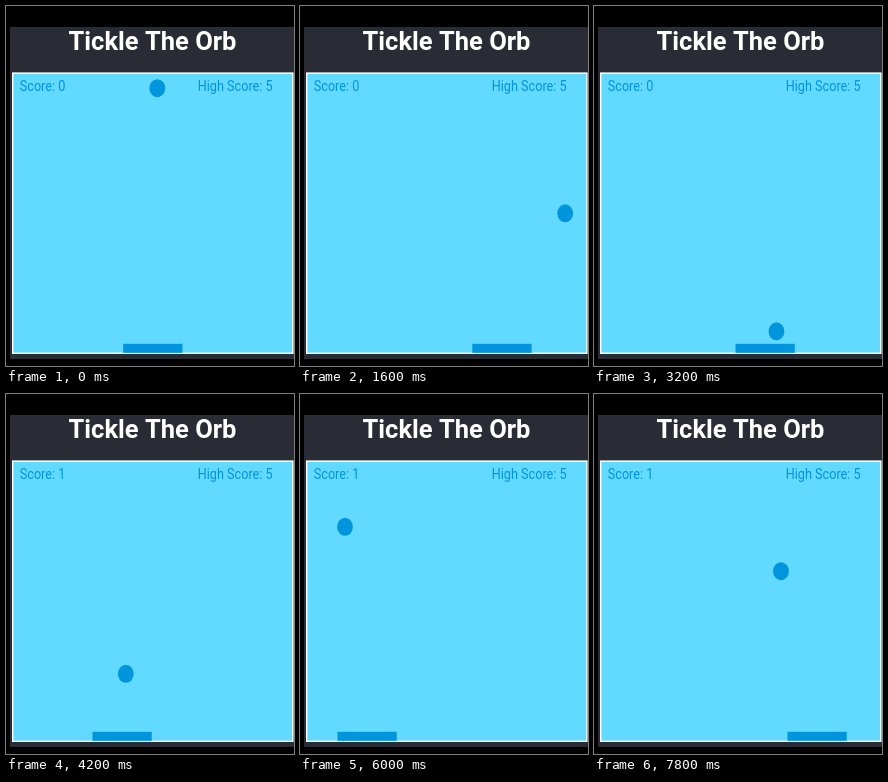
Write an HTML page with a canvas that moves like this. It is 288 px wide and 360 px high and loops after 8 s.

```html
<!DOCTYPE html>
<html lang="en">
<head>
<meta charset="utf-8">
<title>Tickle The Orb</title>
<style>
  html, body { margin: 0; width: 100%; height: 100%; overflow: hidden; background: #000; }
  canvas { display: block; width: 288px; height: 360px; }
</style>
</head>
<body>
<canvas id="stage" width="288" height="360"></canvas>
<script>
const ctx = document.getElementById("stage").getContext("2d");

const LOOP = 8000, STEP = 200;
const BLUE = "#0095dd", SKY = "#62d9fe", DARK = "#292c34";

// The board is drawn in its own units, squeezed onto the stage.
const BOARD = { x: 7, y: 68, sx: 0.79, sy: 0.9 };
// Limits for the centre of the ball, in stage pixels.
const WALL = { left: 15.5, right: 277.5, top: 77, bottom: 337 };
const START = { x: 151.3, y: 82.2 };
const SLOPE = 0.91;

// [time, vertical distance travelled]
const TRAVEL = [[0, 0], [1000, 78], [2400, 188], [4200, 312], [6000, 459], [7000, 567], [7800, 615]];
// [time, left edge of the paddle]
const PADDLE = [[0, 117.2], [1000, 156], [2400, 177], [4200, 86.5], [6000, 37.5], [7000, 131], [7800, 193.5]];

function segment(keys, t) {
  let i = 0;
  while (i < keys.length - 2 && t >= keys[i + 1][0]) i++;
  return i;
}

function linear(keys, t) {
  const i = segment(keys, t);
  const [t0, v0] = keys[i], [t1, v1] = keys[i + 1];
  return v0 + (v1 - v0) * (t - t0) / (t1 - t0);
}

function smooth(keys, t) {
  const i = segment(keys, t), last = keys.length - 1;
  const slope = k => {
    const a = keys[Math.max(k - 1, 0)], b = keys[Math.min(k + 1, last)];
    return (b[1] - a[1]) / (b[0] - a[0]);
  };
  const [t0, v0] = keys[i], [t1, v1] = keys[i + 1];
  const d = t1 - t0, u = (t - t0) / d, w = 1 - u;
  return v0 * (1 + 2 * u) * w * w + slope(i) * d * u * w * w
       + v1 * u * u * (3 - 2 * u) - slope(i + 1) * d * u * u * w;
}

// Folds a straight path back and forth between two walls.
function bounce(v, lo, hi) {
  const span = hi - lo;
  const m = (((v - lo) % (2 * span)) + 2 * span) % (2 * span);
  return lo + (m > span ? 2 * span - m : m);
}

function rect(color, x, y, w, h) {
  ctx.fillStyle = color;
  ctx.fillRect(x, y, w, h);
}

function drawFrame() {
  rect("#000", 0, 0, 288, 360);
  rect(DARK, 4, 21, 284, 332);
  rect("#fff", 6, 66.4, 281.6, 281.6);
  rect(SKY, 7.4, 68, 278.8, 278.6);

  ctx.fillStyle = "#fff";
  ctx.font = "bold 25.5px Roboto, sans-serif";
  ctx.textAlign = "center";
  ctx.fillText("Tickle The Orb", 146.5, 44);
}

function drawBoard(t) {
  const travel = linear(TRAVEL, t);
  const x = bounce(START.x + SLOPE * travel, WALL.left, WALL.right);
  const y = bounce(START.y + travel, WALL.top, WALL.bottom);
  const score = START.y + travel >= WALL.bottom ? 1 : 0;
  const toX = v => (v - BOARD.x) / BOARD.sx;
  const toY = v => (v - BOARD.y) / BOARD.sy;

  ctx.save();
  ctx.translate(BOARD.x, BOARD.y);
  ctx.scale(BOARD.sx, BOARD.sy);
  ctx.fillStyle = BLUE;
  ctx.font = "16px Roboto, sans-serif";
  ctx.textAlign = "left";
  ctx.fillText("Score: " + score, 8.6, 18.9);
  ctx.fillText("High Score: 5", 233.9, 18.9);
  ctx.beginPath();
  ctx.arc(toX(x), toY(y), 10, 0, Math.PI * 2);
  ctx.fill();
  ctx.fillRect(toX(smooth(PADDLE, t)), 299.8, 75, 10);
  ctx.restore();
}

function render() {
  const t = Math.floor((performance.now() % LOOP) / STEP) * STEP;
  drawFrame();
  drawBoard(t);
  requestAnimationFrame(render);
}
render();
</script>
</body>
</html>
```
